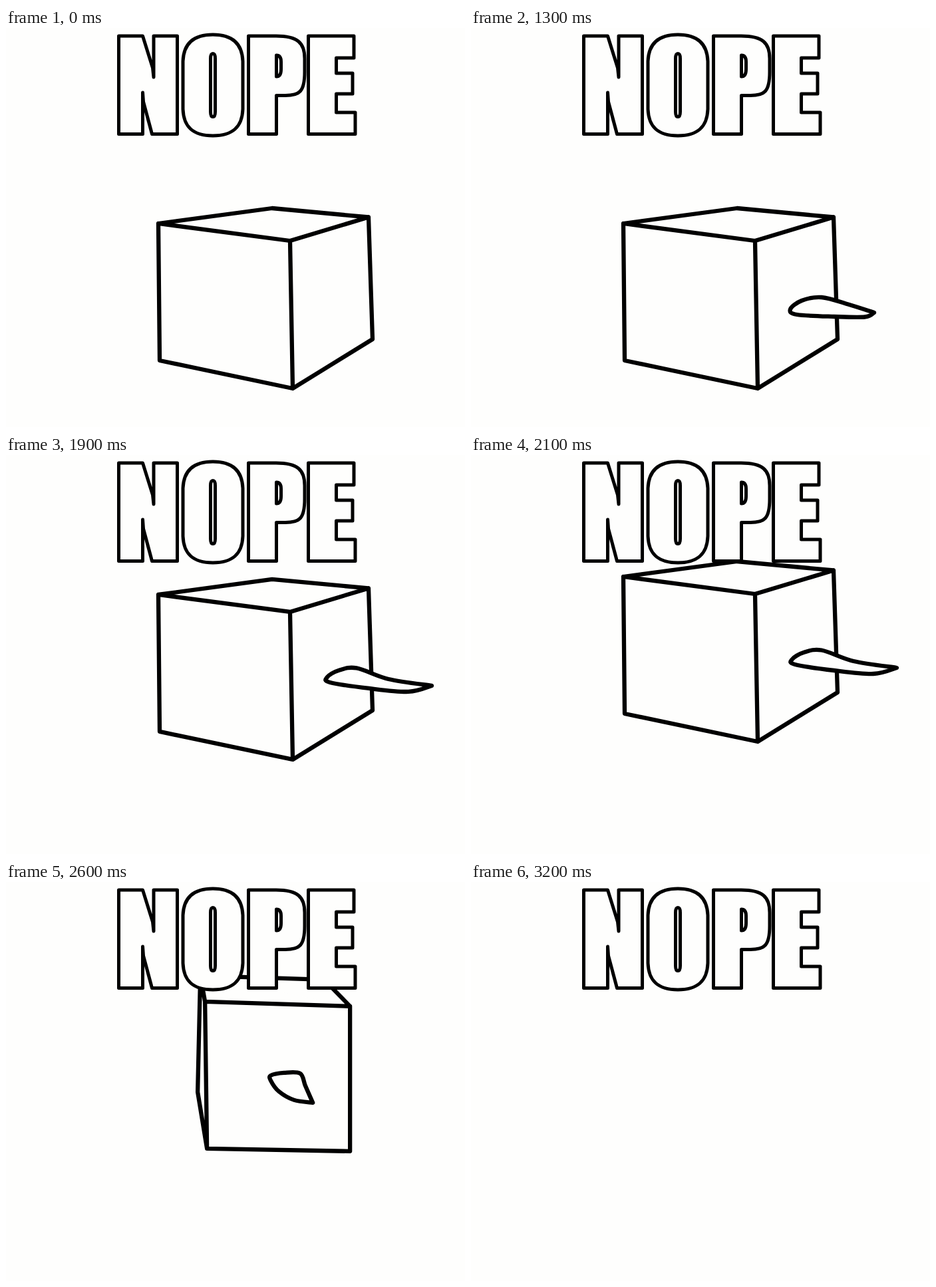
These frames come from a looping animation (690x600 px, 4700 ms). An HTML page:

```html
<!DOCTYPE html>
<html lang="en">
<head>
<meta charset="utf-8">
<title>Nope</title>
<style>
  html, body { margin: 0; width: 100%; height: 100%; overflow: hidden; background: #fefefd; }
  svg { display: block; width: 690px; height: 600px; }
  path { fill: #fefefd; stroke: #000; stroke-linejoin: round; stroke-linecap: round; }
  #box path { stroke-width: 6.3; }
  #word path { stroke-width: 5; }
</style>
</head>
<body>
<svg viewBox="0 0 690 600">
  <g id="box">
    <path id="cube"/>
    <path id="fin"/>
  </g>
  <g id="word" role="img" aria-label="NOPE">
    <path d="M169.500 12H205.500L220.500 60L222 74V12H257.500V159.500H219.500L206.500 111L205.500 97V159.500H169.500Z"/>
    <path d="M311 10C341 10 355 24 356 50V122C355 149 341 162 311 162C281 162 267 149 266 122V50C267 24 281 10 311 10Z"/>
    <path d="M307.500 46Q307.500 38.500 311 38.500T314.500 46V126Q314.500 133.500 311 133.500T307.500 126Z"/>
    <path d="M364.500 12H406C438 12 449 22 449 46V66C449 96 441 101.500 420 101.500H406.500V159.500H364.500Z"/>
    <path d="M406.500 41Q413.500 41 413.500 51V62Q413.500 73 406.500 73Z"/>
    <path d="M454.500 12H523V45H496.500V68H521V99H496.500V127H525V159.500H454.500Z"/>
  </g>
</svg>
<script>
const LOOP = 4700, STEP = 100;

const points = text => text.split(' ').map(p => p.split(',').map(Number));

// Corners: top left, front, right, back; then bottom left, front, right.
const cubeSide = points('229,294 427,320 545,284.500 400,271 231,500 431,542 551,468');
const cubeFront = points('322,142 329,181 547,188 508,148 318,317 332,402 547,406');

// Key points from the sharp tip around the base.
const finShort = points('606,428 592,434.500 546,434 490,431 480,423 497,410 527,405 567,415.500');
const finLong = points('640,431 605,440 546,435 487,426 483,418 500,408 527,404.500 575,421');
const finFront = points('491,333 463,329 440,316 428,300 428,292 448,288 472,289 480,308');

const [box, cube, fin] = ['box', 'cube', 'fin'].map(id => document.getElementById(id));

const clamp = (v, lo, hi) => Math.min(hi, Math.max(lo, v));
const smooth = t => t * t * (3 - 2 * t);
const mix = (a, b, k) => a.map(([x, y], i) => [x + (b[i][0] - x) * k, y + (b[i][1] - y) * k]);
const lift = (pts, dy) => pts.map(([x, y]) => [x, y + dy]);
const grow = (pts, k) => pts.map(([x, y]) => [480 + (x - 480) * k, 421 + (y - 421) * Math.sqrt(k)]);

function cubePath(p) {
  const line = ids => 'M' + ids.map(i => p[i]).join('L');
  return line([0, 3, 2, 6, 5, 4]) + 'Z' + line([0, 1, 2]) + line([1, 5]);
}

// Smooth curve through all points, with a corner at the first.
function finPath(p) {
  const loop = [...p, p[0]];
  const at = i => loop[clamp(i, 0, p.length)];
  const handle = (i, s) => at(i).map((v, c) => v + s * (at(i + 1)[c] - at(i - 1)[c]) / 6);
  return 'M' + p[0] + p.map((_, i) => 'C' + [handle(i, 1), handle(i + 1, -1), at(i + 1)]).join('') + 'Z';
}

function draw(ms) {
  const n = Math.floor(ms / STEP);
  const rise = -111 * smooth(clamp((n - 14) / 7, 0, 1) ** 1.15);
  const turn = clamp((n - 21) / 3, 0, 1);
  const slide = -8 * Math.max(0, n - 24) ** 1.9;
  const pose = (side, front) => mix(lift(side, rise), front, turn);
  const finSide = n < 14 ? grow(finShort, Math.max(0, n - 8) / 5) : finLong;

  box.style.display = n < 32 ? '' : 'none';
  fin.style.display = n < 9 ? 'none' : '';
  box.setAttribute('transform', `translate(${slide} ${slide * 0.038})`);
  cube.setAttribute('d', cubePath(pose(cubeSide, cubeFront)));
  fin.setAttribute('d', finPath(pose(finSide, finFront)));
}

const start = performance.now();
function tick(now) {
  draw(Math.max(0, now - start) % LOOP);
  requestAnimationFrame(tick);
}
draw(0);
requestAnimationFrame(tick);
</script>
</body>
</html>
```
